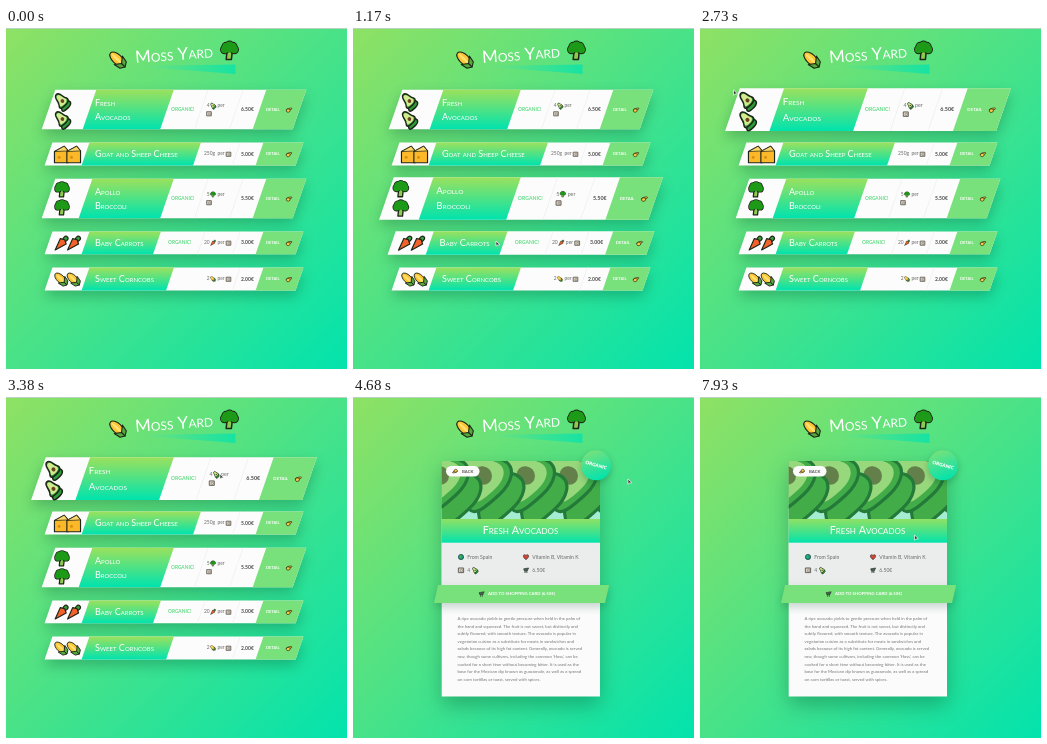
These frames come from a looping animation (341 by 341 pixels, 8 s). An HTML page with a canvas:

```html
<!DOCTYPE html>
<html lang="en">
<head>
<meta charset="utf-8">
<title>Moss Yard</title>
<style>
  html, body { margin: 0; width: 100%; height: 100%; overflow: hidden; background: #50e286; }
  canvas { display: block; width: 100vmin; height: 100vmin; }
</style>
</head>
<body>
<canvas id="stage"></canvas>
<script>
const SIZE = 341, LOOP = 8000, STEP = 130, FADE = 500, OPEN_PAGE = 4680;
const MID = 168, HALF = 125.5, SKEW = -0.345, DETAIL = 85.5;
const LIME = '#9be15d', TEAL = '#00e3ae', LEAF = '#79e17b', INK = '#1d2418', GRAY = '#6a6a6a', PAPER = '#fbfbfb';
const canvas = document.getElementById('stage');
const ctx = canvas.getContext('2d');
let ratio = 1;

// ---------- helpers ----------
const clamp = x => Math.max(0, Math.min(1, x));

// cubic-bezier(.25, .1, .25, 1)
function ease(x) {
  let lo = 0, hi = 1;
  for (let i = 0; i < 16; i++) {
    const u = (lo + hi) / 2;
    if (0.75 * u * (1 - u) + u ** 3 < x) lo = u; else hi = u;
  }
  const u = lo, v = 1 - u;
  return 0.3 * v * v * u + 3 * v * u * u + u ** 3;
}

function at(x, y, scale, turn, draw) {
  ctx.save();
  ctx.translate(x, y);
  ctx.rotate(turn);
  ctx.scale(scale, scale);
  draw();
  ctx.restore();
}

function paint(fill, line, width = 0.16) {
  if (fill) { ctx.fillStyle = fill; ctx.fill(); }
  if (line) { ctx.strokeStyle = line; ctx.lineWidth = width; ctx.lineJoin = 'round'; ctx.stroke(); }
}

function poly(points, fill, line, width) {
  ctx.beginPath();
  points.forEach(p => ctx.lineTo(...p));
  ctx.closePath();
  paint(fill, line, width);
}

function oval(x, y, rx, ry, fill, line, width) {
  ctx.beginPath();
  ctx.ellipse(x, y, rx, ry, 0, 0, 7);
  paint(fill, line, width);
}

function rect(x, y, w, h, fill) {
  ctx.fillStyle = fill;
  ctx.fillRect(x, y, w, h);
}

function text(str, x, y, size, color, weight = 400, align = 'left') {
  ctx.font = `${weight} ${size}px Lato, "Open Sans", sans-serif`;
  ctx.textAlign = align;
  ctx.textBaseline = 'middle';
  ctx.fillStyle = color;
  ctx.fillText(str, x, y);
}

const title = (str, x, y, size, align) => text(str, x, y, size, '#fff', 'small-caps 400', align);

function gradient(x0, y0, x1, y1, from = LIME, to = TEAL) {
  const g = ctx.createLinearGradient(x0, y0, x1, y1);
  g.addColorStop(0, from);
  g.addColorStop(1, to);
  return g;
}

function shaded(dy, blur, alpha, draw) {
  ctx.save();
  ctx.shadowColor = `rgba(0,70,40,${alpha})`;
  ctx.shadowOffsetY = dy * ratio;
  ctx.shadowBlur = blur * ratio;
  draw();
  ctx.restore();
}

// ---------- icons, each about 2 units wide ----------
function pear(fill, line, width) {
  ctx.beginPath();
  ctx.moveTo(0, -1);
  for (const side of [1, -1]) {
    const [a, b] = side > 0 ? [-1, 1] : [1, -1];
    ctx.bezierCurveTo(0.6 * side, a, (a < 0 ? 0.4 : 1.3) * side, a < 0 ? -0.1 : b + 2, 0.72 * side, 0.35);
    ctx.bezierCurveTo((a < 0 ? 0.9 : 0.4) * side, a < 0 ? 0.8 : -0.1, (a < 0 ? 0.4 : 0.6) * side, b, 0, b);
  }
  paint(fill, line, width);
}

// a whole fruit behind a cut half
function avocados(skin, flesh, pit, line, width) {
  at(0.2, 0.25, 0.9, -0.75, () => pear(skin, line, width));
  at(-0.12, -0.12, 0.9, -0.75, () => {
    pear(skin, line, width);
    ctx.scale(0.76, 0.8);
    pear(flesh);
    oval(0, 0.35, 0.34, 0.34, pit);
  });
}

const icons = {
  avocado: () => avocados('#2f9a3a', '#d3ea8e', '#6b4423', INK, 0.2),
  corn() {
    ctx.rotate(-0.8);
    oval(0, -0.15, 0.52, 1, '#fbc736', INK, 0.12);
    oval(0, -0.15, 0.15, 0.8, '#ffe070');
    for (const side of [-1, 1]) poly([[side * 0.65, 0.05], [0, 0.55], [0, 1.1], [side * 0.5, 0.8]], '#55a83c', INK, 0.12);
  },
  broccoli() {
    poly([[-0.25, 0], [-0.35, 0.95], [0.2, 0.95], [0.3, 0]], '#8ccb4d', INK);
    for (const [fill, line] of [[null, INK], ['#1d9a18', null]]) {
      for (let a = Math.PI; a < 6.4; a += Math.PI / 4) oval(0.5 * Math.cos(a), 0.45 * Math.sin(a) - 0.1, 0.4, 0.4, fill, line, 0.2);
      oval(0, -0.2, 0.4, 0.4, fill);
    }
  },
  cheese() {
    poly([[-0.95, -0.4], [0.4, -1.15], [0.95, -0.5], [0.95, 1.15], [-0.95, 1.15]], '#fbb829', INK);
    poly([[-0.95, -0.4], [0.4, -1.15], [0.95, -0.5]], '#ffd768', INK, 0.1);
    oval(-0.3, 0.4, 0.2, 0.2, '#d98b16');
  },
  carrot() {
    ctx.rotate(0.75);
    oval(0, -0.85, 0.3, 0.4, '#3a9d3a', INK);
    poly([[-0.55, -0.4], [0, -0.7], [0.55, -0.4], [0, 1.25]], '#f2622a', INK);
  },
  box() {
    poly([[-0.9, -0.7], [0.9, -0.7], [0.9, 0.9], [-0.9, 0.9]], '#d8d0c0', '#55504a', 0.3);
    oval(0.2, 0.2, 0.4, 0.4, null, '#7a7268', 0.2);
  },
  hand() {
    ctx.rotate(-0.25);
    oval(0.1, -0.25, 1, 0.3, '#ffc83d', INK, 0.2);
    oval(-0.3, 0.1, 0.65, 0.55, '#ffc83d', INK, 0.2);
  },
  globe() {
    oval(0, 0, 0.9, 0.9, '#159c86', '#18463f', 0.25);
    oval(-0.2, -0.1, 0.35, 0.5, '#3fb54a');
  },
  heart() {
    ctx.beginPath();
    ctx.moveTo(0, 0.9);
    ctx.bezierCurveTo(-1.6, -0.2, -0.7, -1.3, 0, -0.5);
    ctx.bezierCurveTo(0.7, -1.3, 1.6, -0.2, 0, 0.9);
    paint('#d0473a', '#43302a', 0.25);
  },
  cart() {
    poly([[-0.8, -0.4], [0.9, -0.7], [0.4, 0.4], [-0.5, 0.4]], '#49665a', INK, 0.2);
    for (const x of [-0.35, 0.3]) oval(x, 0.75, 0.2, 0.2, INK);
  }
};
const icon = (name, x, y, r, turn = 0) => at(x, y, r, turn, icons[name]);

// ---------- pointer: time, x, y ----------
const path = [
  [130, 150, -8], [600, 150, 170], [950, 146, 172], [1080, 143, 213], [1300, 143, 213], [2200, 100, 98],
  [2730, 33.5, 62], [3600, 275, 82], [OPEN_PAGE, 275, 82], [5200, 350, 150], [6370, 240, 350], [7800, 214.5, 138], [LOOP, 214.5, 138]
];

function pointer(t) {
  const i = Math.max(1, path.findIndex(p => p[0] > t));
  const [t0, x0, y0] = path[i - 1], [t1, x1, y1] = path[i];
  const k = clamp((t - t0) / (t1 - t0));
  return { x: x0 + (x1 - x0) * k, y: y0 + (y1 - y0) * k };
}

// how far a hover transition has come at time t
function hover(t, inside) {
  let p = 0;
  for (let s = 0; s < t; s += 10) p = clamp(p + (inside(pointer(s)) ? 10 : -10) / FADE);
  return ease(p);
}

// ---------- list of products; split and end bound the title cell ----------
const cards = [
  { name: ['Fresh', 'Avocados'], icon: 'avocado', split: 83.5, end: 161, organic: true, qty: '4', price: '6.50€' },
  { name: ['Goat and Sheep Cheese'], icon: 'cheese', split: 79.5, end: 191, qty: '250g', price: '5.00€' },
  { name: ['Apollo', 'Broccoli'], icon: 'broccoli', split: 79.5, end: 161, organic: true, qty: '5', price: '5.50€' },
  { name: ['Baby Carrots'], icon: 'carrot', split: 79.5, end: 151, organic: true, qty: '20', price: '3.00€' },
  { name: ['Sweet Corncobs'], icon: 'corn', split: 79.5, end: 164, qty: '2', price: '2.00€' }
];
let nextTop = 61.8;
for (const card of cards) {
  card.tall = card.name.length > 1;
  card.h = card.tall ? 39.5 : 22.8;
  card.y = nextTop + card.h / 2;
  nextTop += card.h + 13.3;
}

function quantity({ icon: kind, qty, tall }) {
  const y = tall ? -4 : 0;
  const weighed = qty.endsWith('g');
  text(weighed ? qty : qty.padStart(2, '\u2007'), 30, y, 4.9, GRAY);
  if (!weighed) icon(kind, 39, y, 2.8);
  text('per', 43.5, y, 4.9, GRAY);
  icon('box', tall ? 35 : 54.5, tall ? 4 : 0, 2.6);
}

function drawCard(card, t) {
  const { tall, h, y } = card, top = -h / 2;
  const over = p => Math.abs(p.x - MID) < 140 && Math.abs(p.y - y) < h * 0.54;
  at(MID, y, 1 + 0.08 * hover(t, over), 0, () => {
    ctx.save();
    ctx.transform(1, 0, SKEW, 1, 0, 0);
    shaded(6, 14, 0.3, () => rect(-HALF, top, 2 * HALF, h, '#fcfcfc'));
    rect(card.split - MID, top, card.end - card.split, h, gradient(0, top, 0, -top));
    if (card.organic) rect(27, top, 0.6, h, '#ececec');
    rect(62, top, 0.6, h, '#ececec');
    rect(DETAIL, top, HALF - DETAIL, h, LEAF);
    ctx.globalAlpha = hover(t, p => over(p) && p.x > MID + DETAIL);
    rect(DETAIL, top, HALF - DETAIL, h, LIME);
    ctx.restore();

    for (const side of [-1, 1]) {
      if (tall) icon(card.icon, -112, side * 9, 7.8);
      else icon(card.icon, -106.5 + side * 6.2, 0.5, 7.2);
    }
    card.name.forEach((line, i) => title(line, -79, tall ? -6.7 + i * 14.2 : 0, 9));
    if (card.organic) text('ORGANIC!', tall ? -3 : -6, 0, 4.8, '#63dc86', 700);
    quantity(card);
    text(card.price, 67, 0, 5, '#4a4a4a', 700);
    text('DETAIL', 92, 0, 4, '#fff', 700);
    icon('hand', 115, 0.5, 3);
  });
}

// ---------- product page ----------
const about = `A ripe avocado yields to gentle pressure when held in the palm of
the hand and squeezed. The fruit is not sweet, but distinctly and
subtly flavored, with smooth texture. The avocado is popular in
vegetarian cuisine as a substitute for meats in sandwiches and
salads because of its high fat content. Generally, avocado is served
raw, though some cultivars, including the common ‘Hass’, can be
cooked for a short time without becoming bitter. It is used as the
base for the Mexican dip known as guacamole, as well as a spread
on corn tortillas or toast, served with spices.`.split('\n');

function drawPhoto(x, y, w, h) {
  ctx.save();
  ctx.beginPath();
  ctx.rect(x, y, w, h);
  ctx.clip();
  rect(x, y, w, h, '#a4ecd2');
  for (let i = 4; i >= 0; i--) {
    at(x - 4 + i * 43, y + 12, 39, 0, () => avocados('#42ad48', '#97d87c', '#64804a', '#237a39', 0.09));
  }
  ctx.restore();
}

function drawFacts() {
  const facts = [['globe', 'From Spain'], ['heart', 'Vitamin B, Vitamin K'], ['box', '4'], ['cart', '6.50€']];
  facts.forEach(([name, label], i) => {
    const x = 108 + (i % 2) * 65, y = 160 + (i >> 1) * 13;
    icon(name, x, y, 2.9);
    text(label, x + 6.3, y + 0.3, 5.1, GRAY);
  });
  icon('avocado', 122, 173, 2.9);
}

function drawPage() {
  const x = 88.7, w = 158.3;
  shaded(8, 20, 0.34, () => rect(x, 64, w, 235.5, PAPER));
  drawPhoto(x, 64, w, 58);

  ctx.beginPath();
  ctx.roundRect(93, 69, 33.5, 10.5, 5.2);
  paint(PAPER);
  icon('hand', 102, 74.2, 2.6, Math.PI);
  text('BACK', 109, 74.4, 4.3, '#555', 700);

  rect(x, 122, w, 24, gradient(0, 120, 0, 146));
  title('Fresh Avocados', 167.5, 133.6, 10.8, 'center');

  rect(x, 145.7, w, 46, '#ebecec');
  drawFacts();

  shaded(4, 9, 0.22, () => poly([[85, 188], [256.2, 188], [252, 206], [81, 206]], LEAF));
  icon('cart', 128.5, 196.8, 2.9);
  text('ADD TO SHOPPING CARD (6.50€)', 135, 197, 4.3, '#fff', 700);

  about.forEach((line, i) => text(line, 104.5, 221.6 + i * 7.63, 4.3, '#777'));

  shaded(3, 7, 0.28, () => oval(243, 68.3, 15, 15, gradient(238, 53, 248, 83, LEAF)));
  at(243, 68.3, 1, 0.26, () => text('ORGANIC', 0, 0, 4.8, '#fff', 900, 'center'));
}

// ---------- backdrop and heading ----------
function drawBackdrop() {
  rect(0, 0, SIZE, SIZE, gradient(-30, -30, SIZE + 5, SIZE + 5));
  rect(0, 0, SIZE, 1, '#b9d2c0');
  ctx.globalAlpha = 0.8;
  poly([[126, 38], [229.5, 36.5], [229.5, 46]], gradient(126, 0, 235, 0, LEAF));
  ctx.globalAlpha = 1;
  icon('corn', 112, 32, 9);
  at(168, 27, 1, -0.075, () => title('Moss Yard', 0, 0, 17, 'center'));
  icon('broccoli', 223.5, 22.5, 9.5);
}

function drawPointer(t) {
  const { x, y } = pointer(t);
  at(x, y, 1, 0, () => {
    if (t < OPEN_PAGE && x > MID + DETAIL) {
      poly([[-0.8, 0], [0.8, 0], [3, 3], [2, 6.6], [-0.8, 6.6], [-2.4, 3.8]], '#fff', '#333', 0.5);
    } else {
      poly([[0, 0], [0, 5.2], [1.4, 4], [3.8, 3.7]], '#333', '#fff', 0.7);
    }
  });
}

// ---------- loop ----------
function resize() {
  const side = Math.min(innerWidth, innerHeight) || SIZE;
  canvas.width = canvas.height = Math.round(side * (devicePixelRatio || 1));
  ratio = canvas.width / SIZE;
}

function frame(now) {
  const t = Math.floor((now % LOOP) / STEP) * STEP;
  ctx.setTransform(ratio, 0, 0, ratio, 0, 0);
  drawBackdrop();
  if (t < OPEN_PAGE) cards.forEach(card => drawCard(card, t));
  else drawPage();
  drawPointer(t);
  requestAnimationFrame(frame);
}

addEventListener('resize', resize);
resize();
requestAnimationFrame(frame);
</script>
</body>
</html>
```
